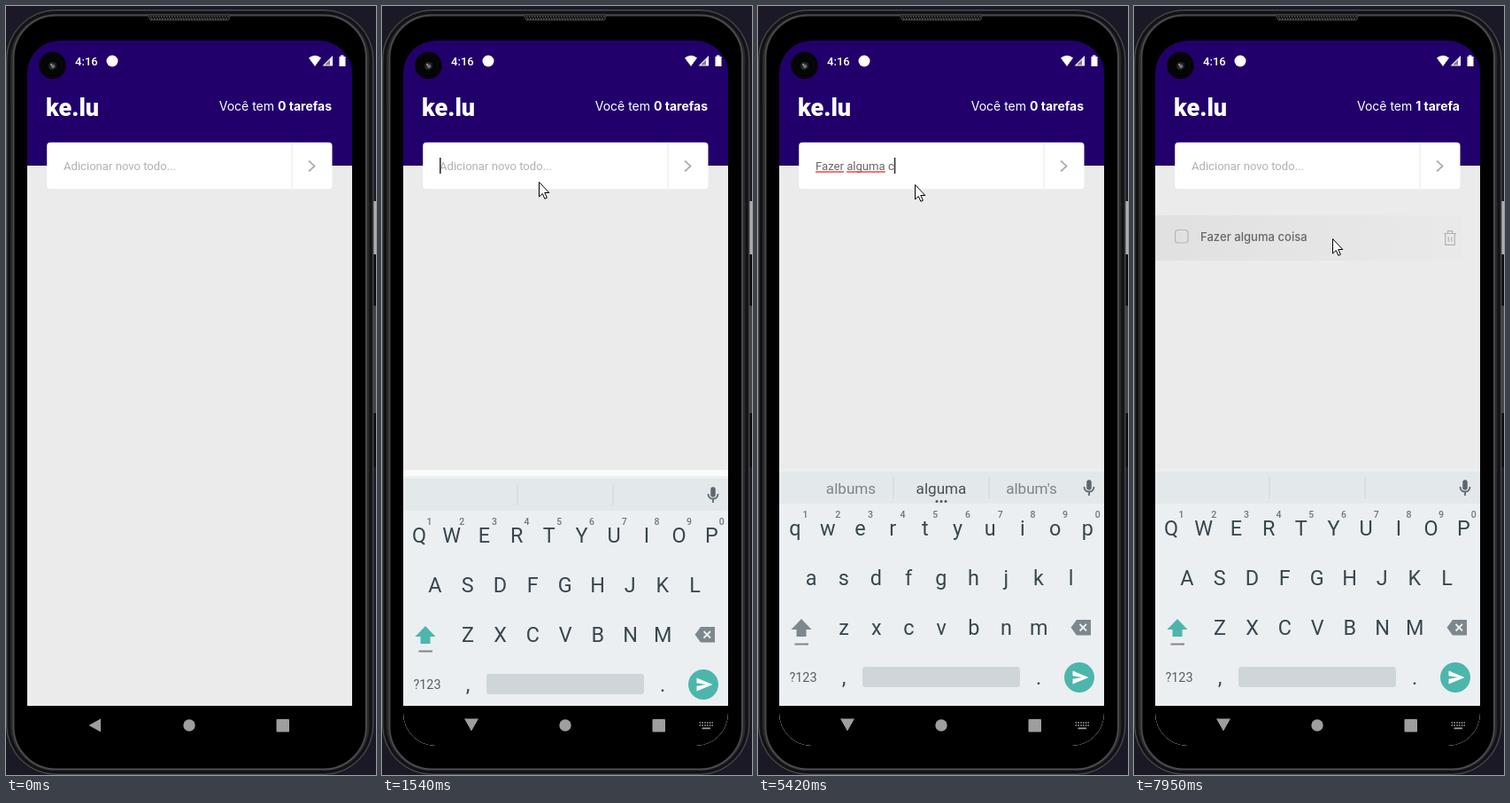
Animation of 418x867 px, one loop 8 s. Source, as an HTML page:

```html
<!DOCTYPE html>
<html lang="pt-BR">
<head>
<meta charset="utf-8">
<title>Lista de tarefas</title>
<style>
html, body { margin: 0; width: 100%; height: 100%; overflow: hidden; background: #1b1926; }
svg { display: block; width: 418px; height: 867px; font-family: Roboto, sans-serif; }
.inter { font-family: Inter, sans-serif; }
.mid { text-anchor: middle; }
text { white-space: pre; }
</style>
</head>
<body>
<svg id="stage" viewBox="0 0 418 867" xmlns="http://www.w3.org/2000/svg">
  <defs>
    <clipPath id="screen"><rect x="24" y="39" width="367" height="795" rx="37"/></clipPath>
    <linearGradient id="rowFill">
      <stop offset="0" stop-color="#c4c4c4" stop-opacity=".27"/>
      <stop offset="1" stop-color="#c4c4c4" stop-opacity=".04"/>
    </linearGradient>
  </defs>

  <!-- phone body -->
  <rect x="412" y="220" width="6" height="60" fill="#aeaeae"/>
  <rect x="412" y="280" width="6" height="240" fill="#0b0b0d"/>
  <rect x="413" y="338" width="5" height="121" fill="#454547"/>
  <rect x=".5" y="4.5" width="414.5" height="862" rx="56" fill="#28292b" stroke="#4f5053"/>
  <rect x="3.5" y="7.5" width="408.500" height="856" rx="53" fill="none" stroke="#121214" stroke-width="3"/>
  <rect x="8.5" y="10.5" width="398.500" height="850" rx="48" fill="#000" stroke="#48494c" stroke-width="2"/>
  <path d="M160 10H254L251 16H163Z" fill="#111" stroke="#4a4a4a"/>
  <path d="M163 12H252M164 14.500H251" stroke="#777" stroke-dasharray="1.5 1.5"/>

  <g clip-path="url(#screen)">
    <rect x="24" y="180" width="367" height="609" fill="#ebebeb"/>
    <rect x="24" y="39" width="367" height="141" fill="#22006b"/>
    <text x="45" y="124" font-size="27" font-weight="900" fill="#fff">ke.lu</text>
    <text class="inter" x="368" y="117.500" font-size="14" fill="#fff" text-anchor="end">Você tem <tspan id="count" font-weight="700">0 tarefas</tspan></text>

    <g id="row">
      <rect x="24" y="236" width="347" height="51" fill="url(#rowFill)"/>
      <rect x="46.500" y="252.500" width="14.500" height="14.500" rx="3.500" fill="none" stroke="#b5b5b5" stroke-width="1.200"/>
      <text class="inter" x="75" y="265" font-size="13.100" font-weight="500" fill="#666">Fazer alguma coisa</text>
      <path d="M350 256.500H364M354.500 256V253.700H359.500V256M351.700 257V269.300H362.300V257M355.300 260.500V265.700M358.700 260.500V265.700" fill="none" stroke="#b2b2b2" stroke-width="1.200"/>
    </g>

    <rect x="46.200" y="153.800" width="322.300" height="52.500" rx="4" fill="#fff"/>
    <path d="M323 154V206" stroke="#ebebeb" stroke-width="1.200"/>
    <path id="chevron" d="M342 174.500L348.500 180.500 342 186.500" fill="none" stroke="#b2b2b2" stroke-width="2"/>
    <text id="entry" x="65" y="185" font-size="13.100"></text>
    <g id="marks"></g>
    <rect id="caret" y="171" width="1.600" height="18" fill="#333"/>

    <!-- keyboard -->
    <rect id="panel" x="24" y="523" width="367" height="311" fill="#fbfbfb"/>
    <g id="board">
      <rect x="24" y="522" width="367" height="420" fill="#eceff1"/>
      <rect x="24" y="525" width="367" height="36" fill="#e3e8ea"/>
      <path d="M153 532V555M261 532V555" stroke="#cfd6d9"/>
      <g id="words" class="mid" font-size="17.100"></g>
      <g id="dots" fill="#4a555b"><circle cx="202" cy="558.500" r="1.500"/><circle cx="207" cy="558.500" r="1.500"/><circle cx="212" cy="558.500" r="1.500"/></g>
      <g fill="none" stroke="#5c686e" stroke-width="1.800"><path d="M368.500 542C368.500 549.500 379.500 549.500 379.500 542M374 547.500V552"/><path d="M374 537V543" stroke-width="5.500" stroke-linecap="round"/></g>
      <g id="keys" class="mid" font-size="23.400" fill="#37474f"></g>
      <path id="shift" d="M49 691L60.500 703H54.500V711H43.500V703H37.500Z"/>
      <path d="M41.500 719.500H57" stroke="#7c878c" stroke-width="2"/>
      <path d="M360 692H376V709.500H360L353.500 700.700Z" fill="#7c888e"/>
      <path d="M363.500 697L371 704.500M371 697L363.500 704.500" stroke="#eceff1" stroke-width="1.800"/>
      <text class="mid" x="51" y="762" font-size="14.400" fill="#546066">?123</text>
      <rect x="118" y="745" width="178" height="23" rx="3" fill="#cfd6d9"/>
      <circle cx="363" cy="757" r="17" fill="#4db6ac"/>
      <path d="M355.500 749.500L373.500 757 355.500 764.500V758.700L366 757 355.500 755.300Z" fill="#fff"/>
    </g>

    <!-- navigation bar -->
    <rect id="navBack" x="23" y="789" width="369" height="46" fill="#000"/>
    <g id="nav">
      <path id="back"/>
      <circle cx="207" cy="811" r="6.700"/>
      <rect x="305.500" y="804" width="14.500" height="14.500" rx="1"/>
      <g id="imeIcon"><path d="M358.500 808H374M358.500 811H374" stroke="#9e9e9e" stroke-width="1.700" stroke-dasharray="1.700 1.100"/><path d="M361.500 814.300H371" stroke="#9e9e9e" stroke-width="1.700"/></g>
    </g>

    <!-- status bar -->
    <text x="78" y="67" font-size="13.100" font-weight="500" fill="#fff">4:16</text>
    <g fill="#fff">
      <circle cx="120" cy="62" r="6.500"/>
      <path d="M342 58.500Q349 53 356 58.500L349 68ZM369 56V67.500H357.500ZM376.500 57H378V55.500H381.500V57H383.500V68H376.500Z"/>
    </g>
    <path d="M366 60.500V66.500H360Z" fill="#22006b" opacity=".55"/>
  </g>
  <circle cx="52.500" cy="67" r="15.300" fill="#050506"/>
  <circle cx="52.500" cy="67.500" r="4.500" fill="#242527"/>
  <circle cx="53" cy="68" r="2" fill="#77797c"/>
  <circle cx="51" cy="66" r="1" fill="#a4a6a8"/>

  <path id="cursor" d="M0 0V16.500L3.800 13 6.400 18.800 8.900 17.700 6.300 12H11.300Z" fill="#fff" stroke="#000" stroke-linejoin="round"/>
</svg>

<script>
const LOOP = 8000, TICK = 1000 / 15, SUBMIT = 7340;
const HINT = "Adicionar novo todo...";
const $ = id => document.getElementById(id);
const pen = document.createElement("canvas").getContext("2d");
const width = s => { pen.font = "13.1px Roboto, sans-serif"; return pen.measureText(s).width; };

function add(parent, tag, attrs, text) {
  const el = document.createElementNS("http://www.w3.org/2000/svg", tag);
  for (const k in attrs) el.setAttribute(k, attrs[k]);
  if (text) el.textContent = text;
  parent.append(el);
  return el;
}
const set = (id, name, value) => $(id).setAttribute(name, value);
const show = (id, on) => set(id, "opacity", +on);

// time, text in the field, suggestions when they refresh
const typing = [
  [0, ""],
  [2820, "F"],
  [2950, "F", "For F From"],
  [3210, "Fa"],
  [3340, "Fa", "Far Fa Fast"],
  [3680, "Faz"],
  [3740, "Faz", "Fax Faz Fad"],
  [3880, "Faze"],
  [3950, "Faze", "Fazed Faze Fade"],
  [4010, "Fazer"],
  [4080, "Fazer", "Frazer Fazer Fazed"],
  [4470, "Fazer "],
  [4540, "Fazer a"],
  [4680, "Fazer al", "all al also"],
  [4810, "Fazer alg"],
  [4880, "Fazer alg", "algae alg along"],
  [4940, "Fazer algu"],
  [5010, "Fazer algum", "album algum albums"],
  [5150, "Fazer alguma"],
  [5220, "Fazer alguma", "albums alguma album's"],
  [5350, "Fazer alguma "],
  [5420, "Fazer alguma c"],
  [5480, "Fazer alguma co", "can c could"],
  [5550, "Fazer alguma coi", "co co-op come"],
  [5620, "Fazer alguma cois", "coin coi coins"],
  [5680, "Fazer alguma coisa", "coins cois coin"],
  [5820, "Fazer alguma coisa", "cosa coisa coins"],
  [SUBMIT, "", " "]
];

// caret visibility
const blink = [[0, 0], [1280, 1], [1750, 0], [2290, 1], [2750, 0], [2820, 1], [6280, 0], [6750, 1], [7880, 0]];

// pointer: time, x, y (smooth between rows)
const path = [
  [460, 311, 440], [660, 232, 286], [867, 171, 176], [940, 171, 176], [1010, 172, 164],
  [1210, 177.500, 198], [1600, 177.500, 198], [1700, 177.500, 201], [6210, 177.500, 201],
  [7010, 346.500, 178], [7470, 346.500, 178], [7900, 224.500, 261], [7930, 224.500, 262]
];

// keyboard entrance: time, drop, opacity
const rise = [[1333, 62, .6], [1400, 50, 1], [1467, 24, 1], [1533, 8, 1], [1600, 0, 1]];

const lastOf = (rows, t) => rows.filter(r => r[0] <= t).pop();

function tween(rows, t, ease) {
  const i = rows.findIndex(r => r[0] > t);
  if (i < 0) return rows[rows.length - 1].slice(1);
  if (i === 0) return rows[0].slice(1);
  const [a, b] = [rows[i - 1], rows[i]];
  const p = ease((t - a[0]) / (b[0] - a[0]));
  return a.slice(1).map((v, k) => v + (b[k + 1] - v) * p);
}
const linear = p => p;
const smooth = p => p * p * (3 - 2 * p);

const letters = [];
[["QWERTYUIOP", 42, 597], ["ASDFGHJKL", 60, 653], ["ZXCVBNM", 97, 709]].forEach(([row, x, y]) =>
  [...row].forEach((ch, i) => letters.push(add($("keys"), "text", { x: x + i * 36.700, y }, ch))));
for (let i = 0; i < 10; i++)
  add($("keys"), "text", { x: 53.500 + i * 36.700, y: 577, "font-size": 10.500, "font-weight": 500, fill: "#6b777d" }, String((i + 1) % 10));
add($("keys"), "text", { x: 97, y: 765 }, ",");
add($("keys"), "text", { x: 317, y: 765 }, ".");
const words = [105, 207, 309].map((x, i) =>
  add($("words"), "text", { x, y: 550, fill: i === 1 ? "#455056" : "#7b868c" }));

function underline(before, word, color, weight) {
  const x = 65 + width(before);
  add($("marks"), "path", { d: `M${x} 187H${x + width(word)}`, stroke: color, "stroke-width": weight });
}

function drawEntry(t) {
  const text = lastOf(typing, t)[1];
  const fresh = lastOf(typing.filter(r => r[2]), t);
  $("entry").textContent = text || HINT;
  set("entry", "fill", text ? "#666" : "#b2b2b2");
  set("caret", "x", 65 + width(text));
  show("caret", lastOf(blink, t)[1]);

  $("marks").replaceChildren();
  const cut = text.lastIndexOf(" ") + 1;
  let before = "";
  for (const w of text.slice(0, cut).split(" ").filter(Boolean)) {
    underline(before, w, "#f0443e", 1.700);
    before += w + " ";
  }
  if (text && fresh && fresh[1].length > cut + 1) underline(before, fresh[1].slice(cut), "#8a8a8a", 1);

  const list = fresh && fresh[2].trim() ? fresh[2].split(" ") : [];
  words.forEach((w, i) => w.textContent = list[i] || "");
  show("dots", list.length > 0);
}

// t drives hard changes, q is the same time held to the frame rate
function drawBoard(t, q) {
  const open = t >= 1340, settled = t >= 1540, sliding = open && !settled;
  const [drop, alpha] = tween(rise, q, linear);
  show("panel", open);
  set("board", "opacity", open ? alpha : 0);
  set("board", "transform", `translate(0 ${Math.round(drop)})`);

  const lower = t >= 2880 && t < SUBMIT + 60;
  letters.forEach(l => l.textContent = lower ? l.textContent.toLowerCase() : l.textContent.toUpperCase());
  set("shift", "fill", lower ? "#7c888e" : "#4db6ac");

  show("navBack", !sliding);
  set("nav", "fill", sliding ? "#fff" : "#9e9e9e");
  set("nav", "opacity", sliding ? .75 : 1);
  set("back", "d", settled ? "M93 803.500H109L101 817.500Z" : "M93.500 811L107 803.500V818.500Z");
  show("imeIcon", settled);
}

function draw(now) {
  const t = now % LOOP;
  const q = Math.floor((t + 7) / TICK) * TICK;
  drawEntry(t);
  drawBoard(t, q);

  const done = t >= SUBMIT;
  $("count").textContent = done ? "1 tarefa" : "0 tarefas";
  show("row", done);
  set("chevron", "opacity", tween([[7070, 1], [7200, .2], [7400, .2], [7600, 1]], q, linear)[0]);

  const [x, y] = tween(path, q, smooth);
  show("cursor", t >= 460);
  set("cursor", "transform", `translate(${Math.floor(x) + .5} ${Math.round(y) + .5})`);
}

const start = performance.now();
function loop() {
  draw(performance.now() - start);
  requestAnimationFrame(loop);
}
loop();
</script>
</body>
</html>
```
